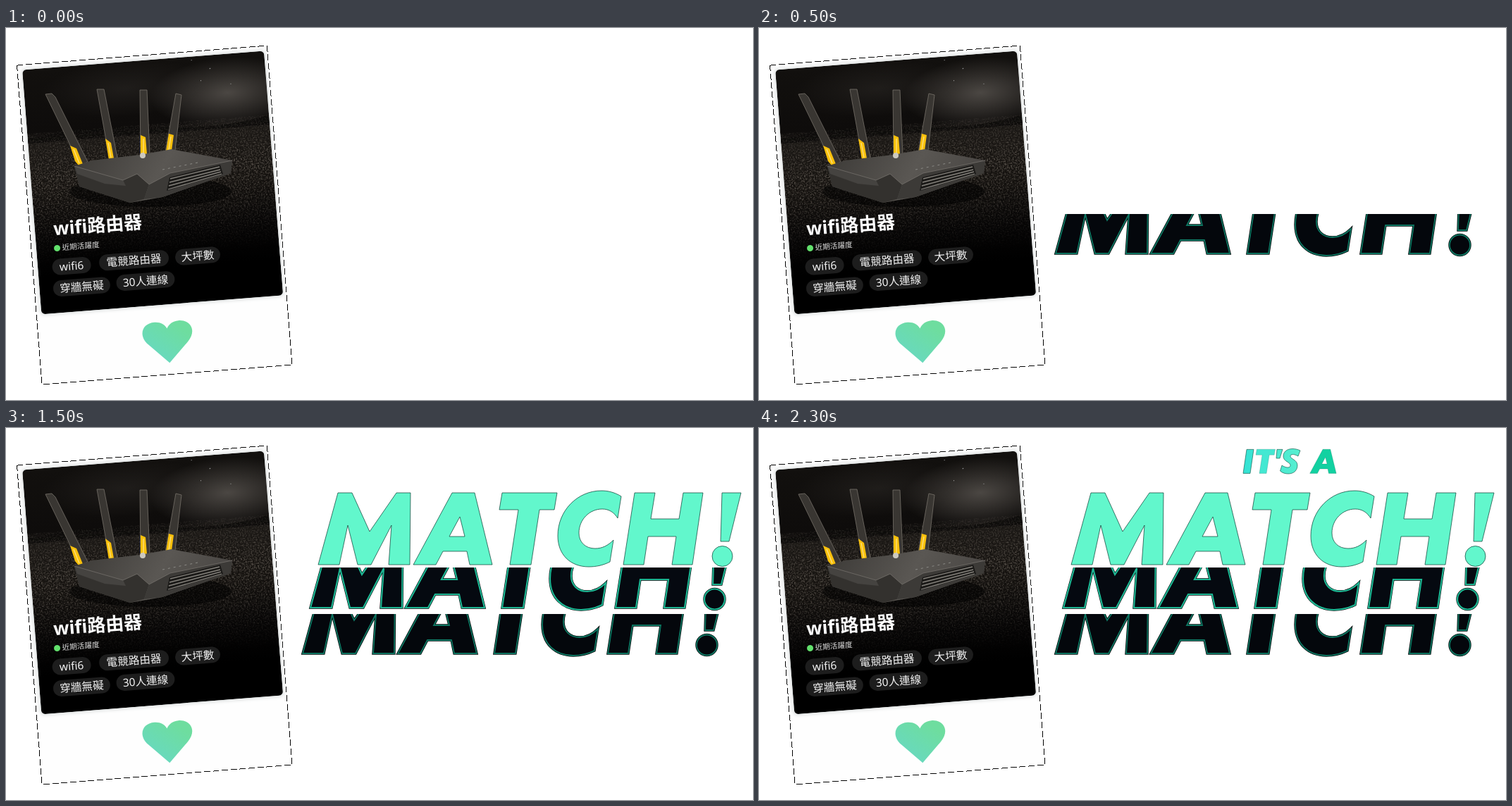
An HTML page for the animation above (2500 ms loop, 1060 by 528 pixels).

```html
<!DOCTYPE html>
<html lang="zh-Hant">
<head>
<meta charset="utf-8">
<title>It's a match!</title>
<style>
  html, body { margin: 0; width: 100%; height: 100%; overflow: hidden; background: #fff; }
  svg { display: block; width: 1060px; height: 528px; }
  text { font-family: "Noto Sans", "Noto Sans CJK TC", "Noto Sans CJK JP", sans-serif; fill: #fff; }
  .title { font-size: 26px; font-weight: 700; }
  .note { font-size: 10.6px; font-weight: 300; fill: #ddd; }
  .tag rect { fill: #1d1d1d; }
  .tag text { font-size: 15.6px; text-anchor: middle; fill: #f2f2f2; }
  .lit { fill: #62f7cc; stroke: #0a3a30; stroke-width: .7; }
  .edge { fill: none; stroke: #020506; stroke-width: 3.4; }
  .mid { fill: #050910; stroke: #1db592; stroke-width: 2.2; }
  .low { fill: #04070c; stroke: #0d7561; stroke-width: 1.8; }
  .its { stroke: #0a4a3c; stroke-width: .6; }
  .its * { vector-effect: non-scaling-stroke; }
</style>
</head>
<body>
<svg viewBox="0 0 1060 528">
  <defs>
    <linearGradient id="aqua" gradientUnits="userSpaceOnUse" x1="686" x2="768" y1="0" y2="0">
      <stop stop-color="#33e2d4"/><stop offset="1" stop-color="#58efd0"/>
    </linearGradient>
    <linearGradient id="love" x1="0" y1="1" x2="1" y2="0">
      <stop offset=".2" stop-color="#68d9be"/><stop offset=".8" stop-color="#6edd9f"/>
    </linearGradient>
    <linearGradient id="night" x1="0" y1="0" x2="0" y2="1">
      <stop stop-color="#12100e"/><stop offset=".26" stop-color="#0e0c0b"/><stop offset=".31" stop-color="#1b1815"/>
      <stop offset=".5" stop-color="#15120f"/><stop offset=".7" stop-color="#060505"/><stop offset=".85" stop-color="#000"/>
    </linearGradient>
    <radialGradient id="cloud">
      <stop stop-color="#4b4743"/><stop offset="1" stop-color="#4b4743" stop-opacity="0"/>
    </radialGradient>
    <linearGradient id="lid" x1="0" y1="0" x2="1" y2=".2">
      <stop stop-color="#3b3936"/><stop offset=".6" stop-color="#5a5753"/><stop offset="1" stop-color="#4a4744"/>
    </linearGradient>
    <linearGradient id="fade" x1="0" y1="0" x2="0" y2="1">
      <stop stop-color="#fff" stop-opacity=".3"/><stop offset=".35" stop-color="#fff"/><stop offset="1" stop-color="#fff" stop-opacity="0"/>
    </linearGradient>
    <mask id="ground"><rect x="7" y="98" width="344" height="190" fill="url(#fade)"/></mask>
    <filter id="gravel" x="0" y="0" width="1" height="1">
      <feTurbulence type="fractalNoise" baseFrequency=".6" numOctaves="2" seed="4"/>
      <feColorMatrix values="0 0 0 0 .3  0 0 0 0 .26  0 0 0 0 .22  2 0 0 0 -.9"/>
    </filter>
    <filter id="soft" x="-.05" y="-.05" width="1.1" height="1.1"><feGaussianBlur stdDeviation="2"/></filter>
    <clipPath id="photo"><rect x="7" y="7" width="344" height="348" rx="6"/></clipPath>
    <clipPath id="midClip"><rect x="420" y="198" width="640" height="63"/></clipPath>
    <clipPath id="lowClip"><rect x="410" y="264" width="640" height="62"/></clipPath>
    <path id="a" fill-rule="evenodd" d="M578 194L633 92H665L690 194H658L654 175H620L610 194ZM629 154H651L644 126Z"/>
    <path id="t" d="M704 92H782L778 116H757L745 194H715L727 116H700Z"/>
    <g id="match">
      <path d="M443 194L471 92H491L516 147L554 92H574L573 194H543L547 138L518 194H499L485 138L473 194Z"/>
      <use href="#a"/>
      <use href="#t"/>
      <path d="M873 97C863 91 854 89 845 89C811 89 783 117 783 153C783 180 801 197 827 197C837 197 847 195 857 190L862 159C854 167 846 171 836 171C822 171 813 162 813 149C813 130 828 115 846 115C856 115 863 120 868 128Z"/>
      <path d="M892 92H921L915 129H955L961 92H989L974 194H945L951 154H911L905 194H876Z"/>
      <path d="M1016 92H1043L1026 161H1014Z"/>
      <circle cx="1016.5" cy="182" r="14.5"/>
    </g>
  </defs>

  <g transform="translate(15.5 53) rotate(-4.5)">
    <rect width="356" height="454.5" fill="#fefefe" stroke="#000" stroke-dasharray="9 3.7" shape-rendering="crispEdges"/>
    <rect x="5" y="5" width="348" height="352" rx="7" fill="#dfe2e2" filter="url(#soft)"/>
    <g clip-path="url(#photo)">
      <rect x="7" y="7" width="344" height="348" fill="url(#night)"/>
      <ellipse cx="295" cy="62" rx="110" ry="50" fill="url(#cloud)"/>
      <ellipse cx="150" cy="45" rx="120" ry="40" fill="url(#cloud)" opacity=".25"/>
      <path d="M7 105Q100 92 190 103T351 98V112H7Z" fill="#0c0a09" opacity=".8"/>
      <g mask="url(#ground)"><rect x="7" y="98" width="344" height="190" filter="url(#gravel)"/></g>
      <path d="M194 5h1M272 26h1.5M258 42h1M247 12h1M228 64h1M300 50h1" stroke="#999" stroke-width="1.2"/>
    </g>
    <text class="title" x="33.4" y="244.5">wifi路由器</text>
    <circle cx="36.5" cy="263.2" r="4.5" fill="#62e06c"/>
    <text class="note" x="43.7" y="266.5">近期活躍度</text>
    <g id="tags"></g>
    <path fill="url(#love)" d="M183 438L155 410C141 396 148 379 166 379C174 379 180 383 183 389C186 383 192 379 200 379C218 379 225 396 211 410Z"/>
  </g>

  <g id="router">
    <ellipse cx="205" cy="232" rx="115" ry="22" fill="#000" opacity=".55"/>
    <g fill="#393632" stroke="#77726a" stroke-width=".8">
      <path d="M56 94L65 93L70 98L116 190L105 195Z"/>
      <path d="M129 87L139 87L158 184L147 187Z"/>
      <path d="M190 88L200 88L204 180L191 182Z"/>
      <path d="M241 93L249 95L240 174L226 176Z"/>
    </g>
    <path fill="#f9c00c" d="M91 167L100 171L109 193L103 195L98 189ZM141 157L149 163L153 185L146 187ZM191 152L198 155L200 179L191 181ZM231 150L238 152L235 174L227 175Z"/>
    <path fill="none" stroke="#fbe38a" stroke-width="1.2" d="M96 172L104 192M145 163L149 184M195 157V178M234 154L231 173"/>
    <path fill="url(#lid)" d="M97 196L122 188L190 180L235 172L321 188L319 206L222 240L176 248L104 225Z"/>
    <path fill="#33312e" d="M97 196L166 216L186 207L203 222L196 243L176 248L104 225Z"/>
    <path fill="#454340" d="M97 196L166 216L170 224L140 221L101 207Z"/>
    <path fill="#3c3a37" d="M203 222L233 206L321 188L319 206L222 240L196 243Z"/>
    <path fill="#1b1a18" d="M232 212L304 194L308 207L228 231Z"/>
    <path fill="none" stroke="#85827c" stroke-width="1.3" d="M233 214L303 197M232 219L304 201M231 224L305 204M230 229L306 207"/>
    <path fill="none" stroke="#75726d" stroke-width=".8" d="M97 196L166 216L186 207L203 222L233 206L321 188"/>
    <path stroke="#8b8a86" stroke-dasharray="3 5" d="M222 201L272 191"/>
    <circle cx="194" cy="181" r="4" fill="#ccc9c0"/>
  </g>

  <g data-from="500" clip-path="url(#lowClip)">
    <use href="#match" x="-22" y="126" class="edge"/><use href="#match" x="-22" y="126" class="low"/>
  </g>
  <g data-from="1000" clip-path="url(#midClip)">
    <use href="#match" x="-11" y="61" class="edge"/><use href="#match" x="-11" y="61" class="mid"/>
  </g>
  <use data-from="1500" href="#match" class="lit" role="img" aria-label="MATCH!"/>
  <g data-from="2000" class="its" role="img" aria-label="IT'S A">
    <g fill="url(#aqua)">
      <path d="M692 30.4H702L697 64.4H687ZM735 30.4H743L739 43H734Z"/>
      <path d="M768 32C764 30 760 29.5 757 29.5C749 29.5 744 34 744 40C744 48 754 48 754 53C754 57 748 57 742 53L739.5 61C743 64 747 65 751 65C759 65 764 60 764 53C764 45 754 44 754 40C754 37 759 36.5 765 40Z"/>
    </g>
    <use href="#t" transform="translate(470.5 -.6) scale(.335)" fill="#44e8d2"/>
    <use href="#a" transform="translate(588 -.6) scale(.335)" fill="#12d1a1"/>
  </g>
</svg>
<script>
  const LOOP = 2500;
  const tag = (label, x, y, width) => `<g class="tag">
    <rect x="${x - width / 2}" y="${y - 11.5}" width="${width}" height="23" rx="11.5"/>
    <text x="${x}" y="${y + 5.6}">${label}</text></g>`;

  document.getElementById('tags').innerHTML =
    tag('wifi6', 55, 290, 55) + tag('電競路由器', 143.8, 289, 99) + tag('大坪數', 234.5, 289.8, 64) +
    tag('穿牆無礙', 67, 320.5, 81) + tag('30人連線', 157.9, 319.5, 83);

  const steps = document.querySelectorAll('[data-from]');

  function draw() {
    const time = performance.now() % LOOP;
    for (const step of steps) {
      step.style.visibility = time >= step.dataset.from ? 'visible' : 'hidden';
    }
    requestAnimationFrame(draw);
  }
  draw();
</script>
</body>
</html>
```
